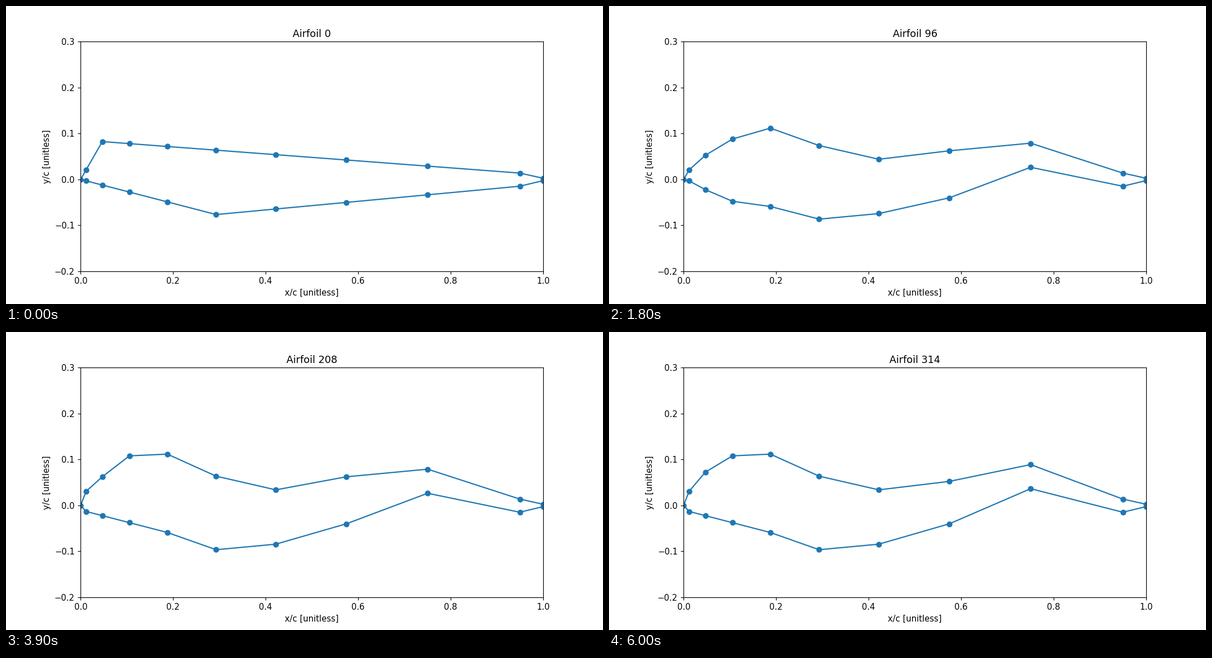
A matplotlib script for the animation above (6300 ms loop, 1058 by 529 pixels).

```python
import numpy as np
import matplotlib.pyplot as plt
from matplotlib.animation import FuncAnimation

FRAMES = 21
INTERVAL = 300
STEP = 0.01
TAIL = 0.0025

# Chordwise stations, spaced quadratically from the leading edge
x = 0.75 * (np.arange(11) / 8) ** 2
x[-1] = 1.0

base_top = np.interp(x, [0, x[2], 1], [0, 0.0825, 0.01])
base_low = np.interp(x, [0, x[5], 1], [0, -0.0765, -0.01])

# Optimiser moves: frame -> ({station: steps} on top, {station: steps} below)
MOVES = {
    1: ({2: -1, 4: 1, 8: 2}, {8: 3}),
    2: ({2: -2, 3: 1, 4: 2, 6: -1, 7: 1, 8: 3},
        {2: -1, 3: -1, 4: -1, 5: -1, 6: -1, 7: 1, 8: 3}),
    4: ({4: 1, 5: 1, 7: 1}, {3: -1}),
    8: ({1: 1}, {1: -1}),
    9: ({2: 1, 3: 1, 5: -1}, {3: 1}),
    11: ({6: -1}, {6: -1}),
    13: ({3: 1}, {5: -1}),
    14: ({3: -1, 5: 1, 8: 1}, {5: 1}),
    18: ({6: 1}, {3: -1}),
    19: ({2: 1, 3: 1, 5: -1, 6: -1, 7: -1}, {3: 1, 5: -1, 8: 1}),
}
CLOSED_TAIL = (3, 19)


def surfaces(frame):
    top, low = base_top.copy(), base_low.copy()
    for when, sides in MOVES.items():
        if when <= frame:
            for y, side in zip((top, low), sides):
                for i, steps in side.items():
                    y[i] += STEP * steps
    low[-1] = -TAIL
    top[-1] = -TAIL if frame in CLOSED_TAIL else TAIL
    return top, low


fig, ax = plt.subplots(figsize=(10, 5), dpi=105.8)
line, = ax.plot([], [], "o-", color="#1f77b4")
ax.set(xlim=(0, 1), ylim=(-0.2, 0.3),
       xlabel="x/c [unitless]", ylabel="y/c [unitless]")
title = ax.set_title("Airfoil 0")


def draw(frame):
    top, low = surfaces(frame)
    line.set_data(np.r_[x[::-1], x[1:]], np.r_[top[::-1], low[1:]])
    title.set_text(f"Airfoil {min(16 * frame, 314)}")
    return line, title


anim = FuncAnimation(fig, draw, frames=FRAMES, interval=INTERVAL,
                     init_func=lambda: draw(0), repeat=True, repeat_delay=0)
plt.show()
```
